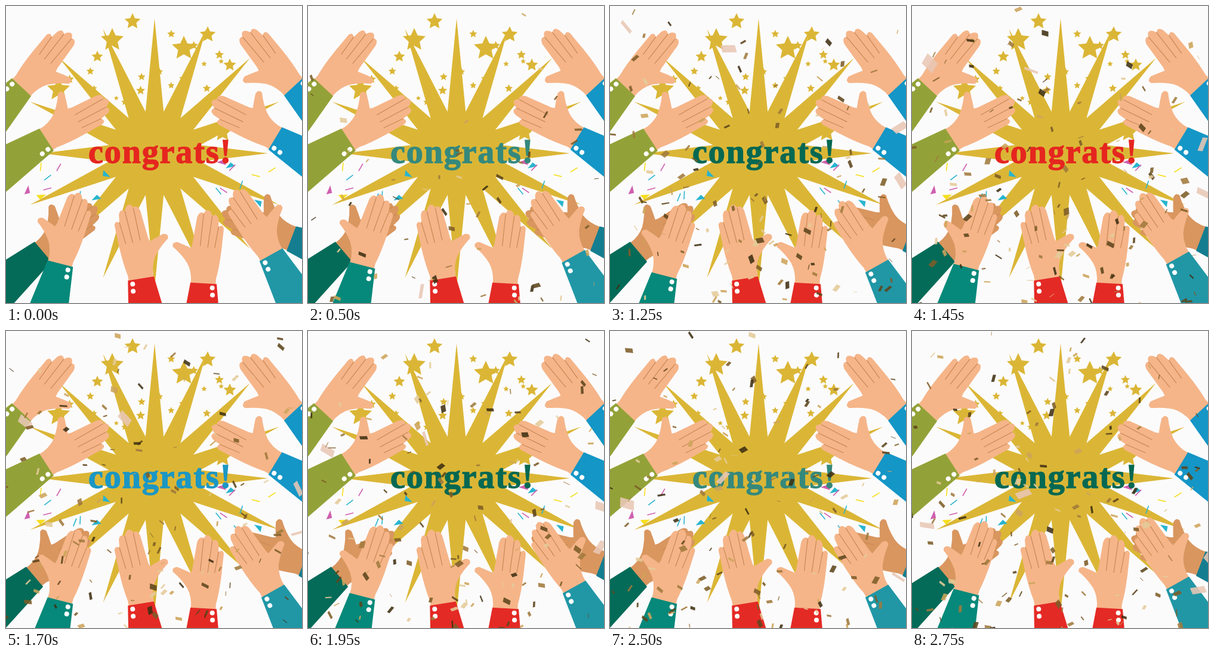
Animation of 496 by 498 pixels, one loop 2800 ms. Source, as an HTML page with a canvas:

```html
<!DOCTYPE html>
<html lang="en">
<head>
<meta charset="utf-8">
<title>congrats!</title>
<style>
html, body { margin: 0; width: 100%; height: 100%; overflow: hidden; background: #fcfbfc; }
canvas { display: block; }
</style>
</head>
<body>
<canvas id="stage" width="496" height="498"></canvas>
<script>
const ctx = document.getElementById('stage').getContext('2d');
const LOOP = 2800, STEP = 50, TAU = Math.PI * 2;
const GOLD = '#dbb636', SKIN = '#f5b589', SHADE = '#d9965f', CREASE = '#c88754';
const OLIVE = '#93a238', BLUE = '#1496c6', RED = '#e42a25', GREEN = '#046b58', JADE = '#06897a', TEAL = '#2197a6';
const TEXT_COLORS = ['#e5261f', '#1b97c4', '#35897c', '#046852'];

function randomFrom(seed) {
  return (min = 0, max = 1) => {
    seed = seed * 16807 % 2147483647;
    return min + (max - min) * seed / 2147483647;
  };
}

function at(x, y, angle, draw) {
  ctx.save();
  ctx.translate(x, y);
  ctx.rotate(angle);
  draw();
  ctx.restore();
}

// Polygon of alternating outer and inner corners, starting at the top.
function spikes(x, y, count, outer, innerX, innerY = innerX) {
  ctx.fillStyle = GOLD;
  ctx.beginPath();
  for (let i = 0; i < count * 2; i++) {
    const a = i * Math.PI / count, tip = i % 2 == 0;
    const r = typeof outer == 'function' ? outer(i / 2) : outer;
    ctx.lineTo(x + (tip ? r : innerX) * Math.sin(a), y - (tip ? r : innerY) * Math.cos(a));
  }
  ctx.fill();
}

function stars() {
  const key = [[178, 57, 20], [212, 26, 14], [298, 71, 21], [338, 48, 14], [375, 99, 11], [153, 85, 10], [88, 140, 20], [363, 212, 16]];
  key.forEach(([x, y, r]) => spikes(x, y, 5, r, r * 0.48));
  const random = randomFrom(29);
  for (let i = 0; i < 20; i++) {
    const a = -0.85 + 1.6 * (i + random()) / 20, d = random(100, 210), r = random(4, 8);
    spikes(249 + d * Math.sin(a), 248 - d * Math.cos(a), 5, r, r * 0.48);
  }
}

// Small bright triangles and strips on both sides of the title.
function scraps() {
  const random = randomFrom(5), colors = ['#cf5fae', '#28b4cf', '#f6de1c', '#28b4cf'];
  for (let i = 0; i < 20; i++) {
    const x = i % 2 ? random(320, 472) : random(36, 180), y = random(256, 336);
    at(x, y, random(0, TAU), () => {
      ctx.fillStyle = colors[(i >> 1) % 4];
      if (i % 3) return ctx.fillRect(-7, -0.8, 14, 1.6);
      ctx.beginPath();
      ctx.lineTo(-8, -4);
      ctx.lineTo(8, 0);
      ctx.lineTo(-4, 5);
      ctx.fill();
    });
  }
}

// Hand pointing up with its wrist at the origin and its thumb on the right.
const palm = new Path2D('M-21 8V-8Q-26 -30 -28 -60L-30 -96Q-28 -104 -21 -99L-20 -112Q-17 -123 -9 -117L-7 -122Q0 -132 6 -121Q13 -125 17 -114L23 -66L25 -60Q37 -65 49 -69Q59 -68 56 -60Q44 -51 35 -40Q24 -28 22 -8V8Z');
const creases = new Path2D('M-21 -99L-16 -62M-9 -117L-4 -62M6 -120L9 -64');
const sleeve = new Path2D('M-22 0H22L40 130H-40Z');
const buttons = new Path2D('M-11 7a4 4 0 1 0 -8 0a4 4 0 1 0 8 0M-12 19a4 4 0 1 0 -8 0a4 4 0 1 0 8 0');

function arm(x, y, degrees, side, cloth, scale = 0.97, skin = SKIN) {
  at(x, y, degrees * Math.PI / 180, () => {
    ctx.scale(side, 1);
    ctx.save();
    ctx.scale(scale, scale);
    ctx.fillStyle = skin;
    ctx.fill(palm);
    ctx.strokeStyle = CREASE;
    ctx.lineWidth = 1.2;
    ctx.stroke(creases);
    ctx.restore();
    ctx.fillStyle = cloth;
    ctx.fill(sleeve);
    ctx.fillStyle = '#fff';
    if (skin == SKIN) ctx.fill(buttons);
  });
}

function arms(open) {
  arm(26, 136, 43, 1, OLIVE);
  arm(68, 224, 57, -1, OLIVE);
  arm(482, 135, -43, -1, BLUE, 0.99);
  arm(451, 222, -59, 1, BLUE);
  arm(62 - 14 * open, 412, 50, -1, GREEN, 0.93, SHADE);
  arm(91, 432 + 20 * open, 14.5, -1, JADE);
  arm(478 + 20 * open, 390, -69, 1, '#147e90', 0.98, SHADE);
  arm(444 + 3 * open, 417 + 19 * open, -29, 1, TEAL, 0.98);
  arm(226, 457, -9, 1, RED, 0.99);
  arm(331, 465, 3, -1, RED);
}

const random = randomFrom(11);
const PAPER = ['#3f3012', '#5d461c', '#7d5d28', '#a07a3c', '#cda45a', '#e4cb98'];
const confetti = Array.from({ length: 130 }, (_, i) => {
  const large = i % 32 == 31;
  return {
    x: random(0, 496), fall: random(), speed: random(0.2, 0.42),
    size: large ? 24 : random(6, 13), ratio: random(0.25, 0.85),
    angle: random(0, TAU), spin: random(-4, 4), flip: random(3, 9), phase: random(0, TAU),
    color: large ? '#e8c7b5' : PAPER[Math.floor(random(0, PAPER.length))],
    start: 50 + i * 8
  };
});

function drawConfetti(time) {
  const s = time / 1000;
  ctx.globalAlpha = 0.88;
  for (const p of confetti) {
    if (time < p.start) continue;
    // Pieces slow down on the way, so they gather in the lower half.
    const y = 530 * ((p.fall + p.speed * s) % 1) ** 0.65 - 16;
    at(p.x + 7 * Math.sin(2 * s + p.phase), y, p.angle + p.spin * s, () => {
      ctx.transform(1, 0, 0.25, 1, 0, 0);
      ctx.fillStyle = p.color;
      const height = p.size * p.ratio * (0.25 + 0.75 * Math.abs(Math.cos(p.flip * s + p.phase)));
      ctx.fillRect(-p.size / 2, -height / 2, p.size, height);
    });
  }
  ctx.globalAlpha = 1;
}

// Six claps per loop, each resting with the hands apart.
function clapAt(time) {
  const phase = time / LOOP * 6 % 1;
  const k = Math.min(1, Math.min(phase, 1 - phase) / 0.3);
  return k * k * (3 - 2 * k);
}

function title(time) {
  ctx.font = 'bold 56px "Liberation Serif", "Times New Roman", serif';
  ctx.letterSpacing = '1.9px';
  ctx.fillStyle = ctx.strokeStyle = TEXT_COLORS[Math.floor(time % 700 / 175)];
  ctx.lineWidth = 1.3;
  ctx.fillText('congrats!', 138, 263);
  ctx.strokeText('congrats!', 138, 263);
}

function frame(now) {
  const time = Math.floor(now % LOOP / STEP) * STEP;
  ctx.fillStyle = '#fcfbfc';
  ctx.fillRect(0, 0, 496, 498);
  spikes(249, 247, 16, i => i % 8 == 4 ? 190 : 226, 78, 71);
  stars();
  scraps();
  arms(clapAt(time));
  title(time);
  drawConfetti(time);
}

const begin = performance.now();
function tick() {
  frame(performance.now() - begin);
  requestAnimationFrame(tick);
}
tick();
</script>
</body>
</html>
```
